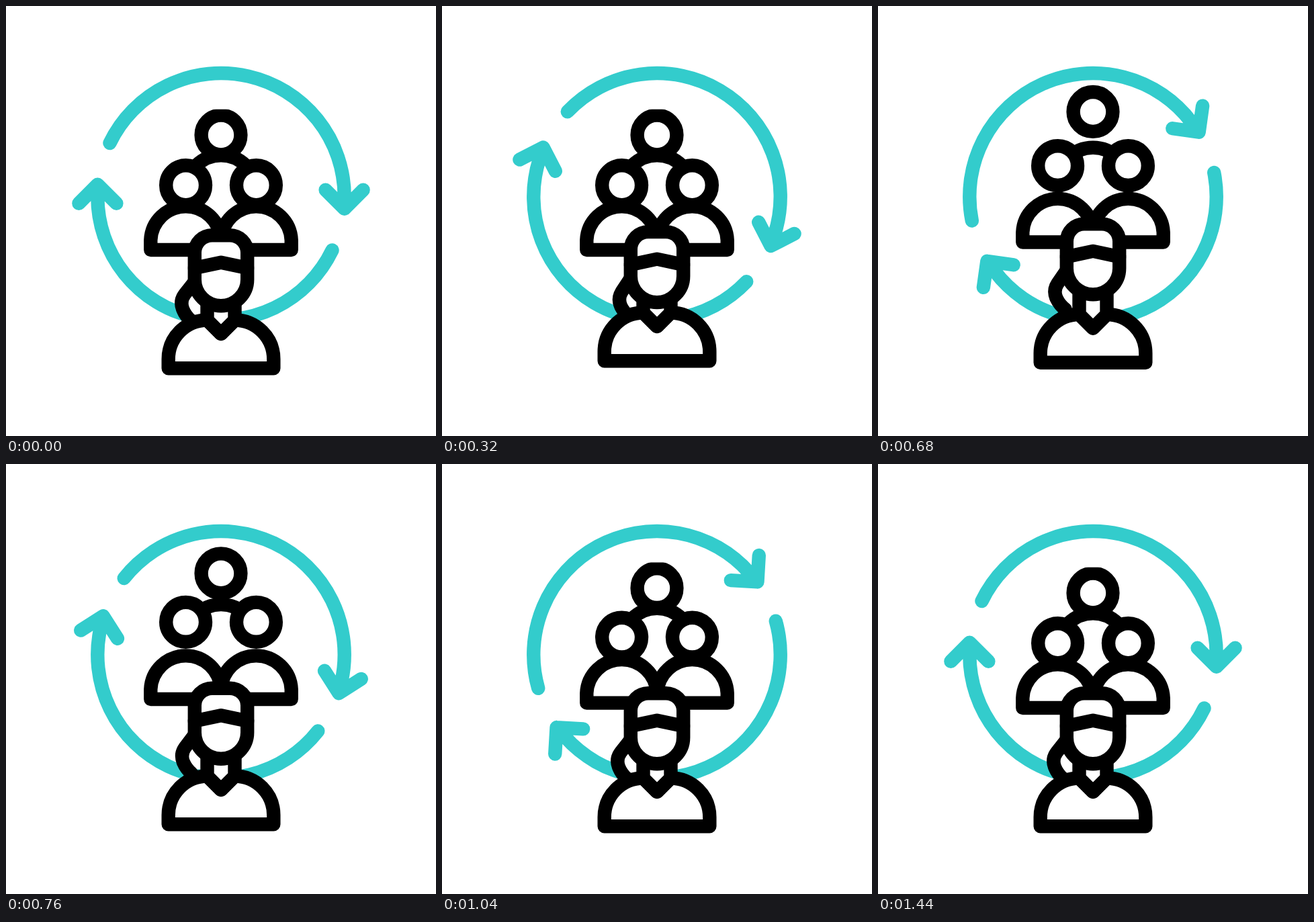
An HTML page for the animation above (1.72 s loop, 640x640 px).

```html
<!DOCTYPE html>
<html lang="en">
<head>
<meta charset="utf-8">
<title>Team cycle</title>
<style>
  html, body { margin: 0; width: 100%; height: 100%; overflow: hidden; background: #fff; }
  svg { display: block; width: 100%; height: 100%; }
  .line { fill: none; stroke: #000; stroke-width: 20.4; stroke-linecap: round; stroke-linejoin: round; }
  .solid { fill: #fff; }
  .teal { stroke: #3cc; }
</style>
</head>
<body>
<svg viewBox="0 0 640 640">
  <defs>
    <clipPath id="crop"><rect id="cropBox" x="260" y="153.8" width="120" height="120"/></clipPath>
    <path id="arrow" d="M154.5 204A183.7 183.7 0 0 1 503.7 283.75V301.8M475.6 273.8L503.7 301.8L531.6 273.8"/>
    <path id="bust" d="M215.3 363V348.5A52.4 52.4 0 0 1 320 348.5V363Z"/>
  </defs>

  <g id="ring" class="line teal">
    <use href="#arrow"/>
    <use href="#arrow" transform="rotate(180 320 283.75)"/>
  </g>

  <g id="topBody">
    <path class="line solid" style="stroke-linecap:butt" d="M267.6 274.6A52.4 52.4 0 0 1 372.4 274.6"/>
    <g clip-path="url(#crop)">
      <circle id="topHead" class="line solid" cx="320" cy="192" r="29.4"/>
    </g>
  </g>

  <g id="sideBody" class="line solid">
    <use href="#bust"/>
    <use href="#bust" x="104.7"/>
    <g id="sideHead">
      <circle cx="267.6" cy="266.7" r="29.4"/>
      <circle cx="372.4" cy="266.7" r="29.4"/>
    </g>
  </g>

  <g id="tail">
    <path fill="#fff" d="M266 429L292 410V462H270Z"/>
    <path class="line" d="M281 410L266 429Q258.5 439 263 451Q267 461 275 468"/>
  </g>
  <g id="leadBody">
    <path fill="#fff" d="M299.5 430H340.5V490H299.5Z"/>
    <path class="line solid" d="M299.5 467.5A58 58 0 0 0 241.7 525.5V539.3H398.3V525.5A58 58 0 0 0 340.5 467.5L320 488Z"/>
    <path fill="#fff" d="M299.5 460H340.5V467.5L320 488L299.5 467.5Z"/>
    <path class="line" d="M299.5 430V467.5L320 488L340.5 467.5V430"/>
  </g>
  <g id="leadHead">
    <path class="line solid" d="M280.8 367A26 26 0 0 1 306.8 341.2H333.2A26 26 0 0 1 359.2 367V407A39.2 39.2 0 0 1 280.8 407Z"/>
    <path class="line" d="M280.8 390L320 381.7L359.2 390"/>
  </g>
</svg>
<script>
  const LOOP = 1720, STEP = 40, PULL = 0.59;
  const el = id => document.getElementById(id);
  const shift = (id, y) => el(id).setAttribute('transform', `translate(0 ${-y})`);

  // Symmetric cubic-bezier(PULL, 0, 1 - PULL, 1)
  function ease(x) {
    if (x <= 0) return 0;
    if (x >= 1) return 1;
    let lo = 0, hi = 1, s;
    for (let i = 0; i < 24; i++) {
      s = (lo + hi) / 2;
      const r = 1 - s;
      const bx = 3 * PULL * s * r * r + 3 * (1 - PULL) * s * s * r + s * s * s;
      if (bx < x) lo = s; else hi = s;
    }
    return s * s * (3 - 2 * s);
  }

  // Rise from start to peak, then fall back to rest at end
  const hop = (t, start, peak, end, height) =>
    height * ease(t < peak ? (t - start) / (peak - start) : (end - t) / (end - peak));

  function draw(t) {
    el('ring').setAttribute('transform', `rotate(${360 * ease((t - 40) / 1400)} 320 283.75)`);

    const lead = hop(t, 40, 480, 920, 14);
    const head = hop(t, 170, 560, 920, 20.3);
    shift('leadBody', lead);
    shift('leadHead', head);
    el('tail').setAttribute('transform', `translate(0 ${-head}) rotate(${-lead * 0.43} 281 410)`);

    const back = hop(t, 360, 820, 1280, 13.3);
    const top = hop(t, 360, 620, 950, 24);
    shift('topBody', back);
    shift('sideBody', back);
    shift('topHead', top);
    shift('sideHead', hop(t, 435, 740, 1130, 18.4));
    el('cropBox').setAttribute('y', top < 2 ? 153.8 : 110);
    el('cropBox').setAttribute('height', 130);
  }

  function tick() {
    const t = performance.now() % LOOP;
    draw(Math.floor(t / STEP) * STEP);
    requestAnimationFrame(tick);
  }
  tick();
</script>
</body>
</html>
```
